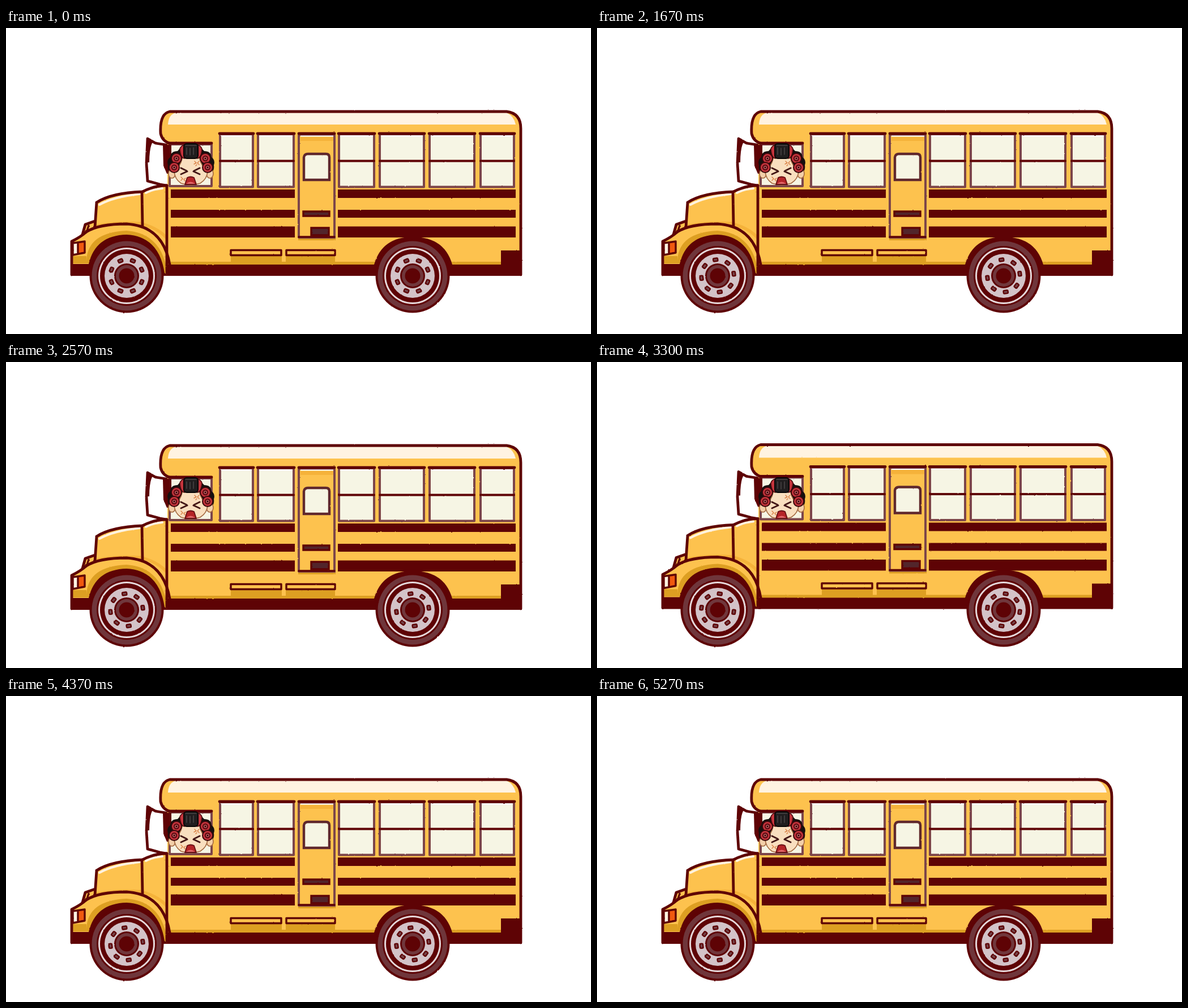
An HTML page that plays this animation: 1033x542 px, repeating every 5.41 s.

```html
<!DOCTYPE html>
<html lang="en">
<head>
<meta charset="utf-8">
<title>School bus</title>
<style>
  html, body { margin: 0; width: 100%; height: 100%; overflow: hidden; background: #fff; }
  svg { display: block; width: 100%; height: 100%; }
  .ink { fill: #5e0305; }
  .line { fill: none; stroke: #5e0305; stroke-width: 4.8; stroke-linejoin: round; stroke-linecap: round; }
  .thin { stroke-width: 3.4; }
  .body { fill: #fdc24e; }
  .shade { fill: #dd9f22; }
  .soft { fill: #f5b23a; }
  .cream { fill: #fff3e1; }
  .glass { fill: #f6f5e4; stroke: #7c454a; stroke-width: 4; stroke-linejoin: round; }
</style>
</head>
<body>
<svg viewBox="0 0 1033 542">
  <defs>
    <filter id="rough" filterUnits="userSpaceOnUse" x="100" y="130" width="830" height="390" color-interpolation-filters="sRGB">
      <feTurbulence type="fractalNoise" baseFrequency="0.28" numOctaves="1" seed="4"/>
      <feDisplacementMap in="SourceGraphic" scale="2" xChannelSelector="R" yChannelSelector="G"/>
    </filter>
  </defs>

  <g id="bus"><g filter="url(#rough)">
    <!-- mirror -->
    <path d="M250 197L264 204L283 207V278L272 276L250 271L248 240Z" fill="#fff"/>
    <path class="line" d="M283 207L264 204L250 196L248 240L250 271L272 277L284 279"/>
    <path class="ink" d="M249 197L259 202Q253 212 253 238H247Z"/>

    <!-- cabin -->
    <path class="body" d="M289 148H884Q909 151 909 178V438H285V205Q276 200 273 187Q271 152 289 148Z"/>
    <path class="cream" d="M286 171Q287 153 300 150H884Q897 156 900 171Z"/>
    <path class="shade" d="M291 414H874V420H291Z"/>

    <!-- hood and nose -->
    <path class="body" d="M135 366L140 347L157 342L160 309Q186 292 241 290Q262 279 285 280V438H116V378Z"/>
    <path class="soft" d="M159 348Q200 340 240 344V352Q200 343 159 353ZM243 345Q268 352 284 368V376Q266 356 243 351Z"/>
    <path d="M165 313Q190 299 236 294M247 292Q258 286 276 284" fill="none" stroke="#fff3e1" stroke-width="4" stroke-linecap="round"/>
    <path class="line" d="M135 366L140 348L157 342M157 353L160 309Q186 292 241 290Q262 279 284 279M240 290L241 350"/>
    <path class="line thin" d="M146 350L142 362"/>
    <path class="shade" d="M142 412Q144 362 213 359Q276 364 285 434H276Q270 372 213 369Q158 372 148 417H118V404H142Z"/>
    <path class="ink" d="M146 439V418Q158 367 213 366Q270 369 280 434L290 439ZM115 418H148V439H115Z"/>
    <path class="line" d="M116 437V378Q132 370 142 361Q164 347 213 347Q284 351 291 434"/>
    <path d="M119 381H127V401H119Z" fill="#fff3e1"/>
    <path d="M128 380H139V398H128Z" fill="#f0590f"/>
    <path class="line thin" d="M118 381L139 378V398L118 402ZM127 380V399"/>

    <!-- underside -->
    <path class="ink" d="M285 419H650Q664 370 718 370Q774 370 788 419H874V394H911V439H285Z"/>
    <path class="line" d="M284 434V279M291 205Q276 201 273 187Q271 152 289 148H884Q909 151 909 178V437"/>

    <g id="stripes" class="ink"></g>
    <g id="windows"></g>

    <!-- driver window -->
    <path class="glass" d="M289 206H363V280H289Z"/>
    <path class="line" d="M287 204H363"/>
    <path class="ink" d="M277 207H292V244L287 258H284L278 244Z"/>

    <!-- door -->
    <path class="shade" d="M516 369H582V376H516Z"/>
    <path class="body" d="M517 189H580V371H517Z" stroke="#7c454a" stroke-width="4"/>
    <path class="soft" d="M520 193H578V200H520Z"/>
    <path d="M520 191.5H578" stroke="#fff" stroke-width="2"/>
    <path class="line" d="M517 187H580"/>
    <path class="line thin" d="M517 370H580"/>
    <path d="M526 269V229Q527 223 533 223H565Q571 223 571 229V269Z" fill="#f6f5e4" stroke="#60282d" stroke-width="4.4"/>
    <path d="M525 325H571V333H525ZM539 354H570V367H539Z" fill="#52252b" stroke="#5e0305" stroke-width="3.4"/>

    <!-- side lockers -->
    <path class="shade" d="M397 403H487V417H397ZM494 403H581V417H494Z"/>
    <path class="line thin" style="fill:#fdc24e" d="M397 393.5H486V402.5H397ZM495 393.5H581V402.5H495Z"/>
  </g></g>

  <g id="wheels" filter="url(#rough)"></g>

  <!-- driver -->
  <g stroke-linecap="round" stroke-linejoin="round">
    <path d="M297 260Q284 256 286 243Q283 234 290 229Q291 218 303 218Q310 207 326 207Q342 207 350 218Q362 218 363 229Q370 234 367 243Q369 256 356 260Z" fill="#16100f"/>
    <g fill="#f3cfa9" stroke="#a4683f" stroke-width="1.6">
      <ellipse cx="293" cy="258" rx="6" ry="8"/>
      <ellipse cx="360" cy="258" rx="6" ry="8"/>
      <path d="M297 252Q308 246 311 231Q326 226 342 231Q345 246 356 252Q356 267 343 275Q326 281 309 275Q297 267 297 252Z" fill="#f9dfbf"/>
    </g>
    <path d="M307 214Q309 208 316 207V231Q308 231 307 214ZM346 214Q344 208 337 207V231Q345 231 346 214Z" fill="#c4343c" stroke="#4b080c" stroke-width="1.5"/>
    <rect x="314" y="205" width="25" height="26" rx="5" fill="#201d1e" stroke="#070606" stroke-width="2"/>
    <path d="M319 212V224M325 213V225M331 212V224M317 208H336" fill="none" stroke="#4a4647" stroke-width="1.5"/>
    <g id="rollers"></g>
    <path d="M309 248L319 253M320 254L309 259M342 248L332 253M331 254L342 259" fill="none" stroke="#431716" stroke-width="3"/>
    <path d="M320 265Q326 262 332 265L336 277H316Z" fill="#b52427" stroke="#651014" stroke-width="1.8"/>
    <path d="M318 276Q326 269 334 276Z" fill="#e4686a"/>
    <path d="M333 236L336 239L332 241M341 236L338 239L341 242M335 244L337 242M309 264L312 267L309 270M317 266L314 268L316 271" fill="none" stroke="#d98145" stroke-width="1.4"/>
  </g>
</svg>
<script>
  const byId = id => document.getElementById(id);

  byId("stripes").innerHTML = [[286, 15], [322, 14], [351.5, 19.5]].map(([y, h]) =>
    `<path d="M291 ${y}H510V${y + h}H291ZM586 ${y}H900V${y + h}H586Z"/>`).join("");

  byId("windows").innerHTML =
    [[378, 436], [445, 508], [588, 650], [660, 738], [748, 827], [838, 897]].map(([a, b]) =>
      `<path class="glass" d="M${a} 188H${b}V281.5H${a}Z"/>
       <path d="M${a + 2} 191.5H${b - 2}" stroke="#fff" stroke-width="2"/>
       <path class="line" style="stroke-width:4" d="M${a} 235.5H${b}"/>
       <path class="line" d="M${a - 1} 187H${b + 1}"/>`).join("");

  byId("rollers").innerHTML = [[301, 231], [297, 247], [352, 231], [356, 247]].map(([x, y]) =>
    `<g transform="translate(${x} ${y})"><circle r="9" fill="#c4343c" stroke="#3a080b" stroke-width="2"/>
     <circle r="4" fill="#e8777a" stroke="#5e0c12" stroke-width="2.4"/><circle r="1.8" fill="#2b0a0c"/></g>`).join("");

  const disc = (r, fill) => `<circle r="${r}" fill="${fill}"/>`;
  const holes = Array.from({ length: 8 }, (_, i) =>
    `<rect x="-4" y="-31.5" width="8" height="5.5" rx="1.5" transform="rotate(${i * 45})"
      fill="#75464c" stroke="#5e0305" stroke-width="2.4"/>`).join("");
  const discs = [[65.5, "#5e0305"], [61.5, "#6f363b"], [53, "#5e0305"], [50, "#e5d8da"],
    [47, "#5e0305"], [39, "#d3c3c8"], [22, "#5e0305"], [19, "#70373c"], [13.5, "#5e0305"]]
    .map(d => disc(...d)).join("");
  byId("wheels").innerHTML = [213, 718].map(x =>
    `<g transform="translate(${x} 439)">${discs}<g class="spin">${holes}</g></g>`).join("");

  const bus = byId("bus");
  const spins = document.querySelectorAll(".spin");
  const LOOP = 5410, BEAT = 300, HOLD = 170;
  const lift = [0, 1.5, 3, 3, 1.5, 0];

  function draw(ms) {
    const t = ms % LOOP;
    const step = 2 * Math.floor(t / BEAT) + (t % BEAT >= HOLD ? 1 : 0);
    bus.setAttribute("transform", `translate(0 ${-lift[step % 6]})`);
    for (const s of spins) s.setAttribute("transform", `rotate(${22.5 - 15 * step})`);
  }

  const start = performance.now();
  function tick() {
    draw(performance.now() - start);
    requestAnimationFrame(tick);
  }
  tick();
</script>
</body>
</html>
```
